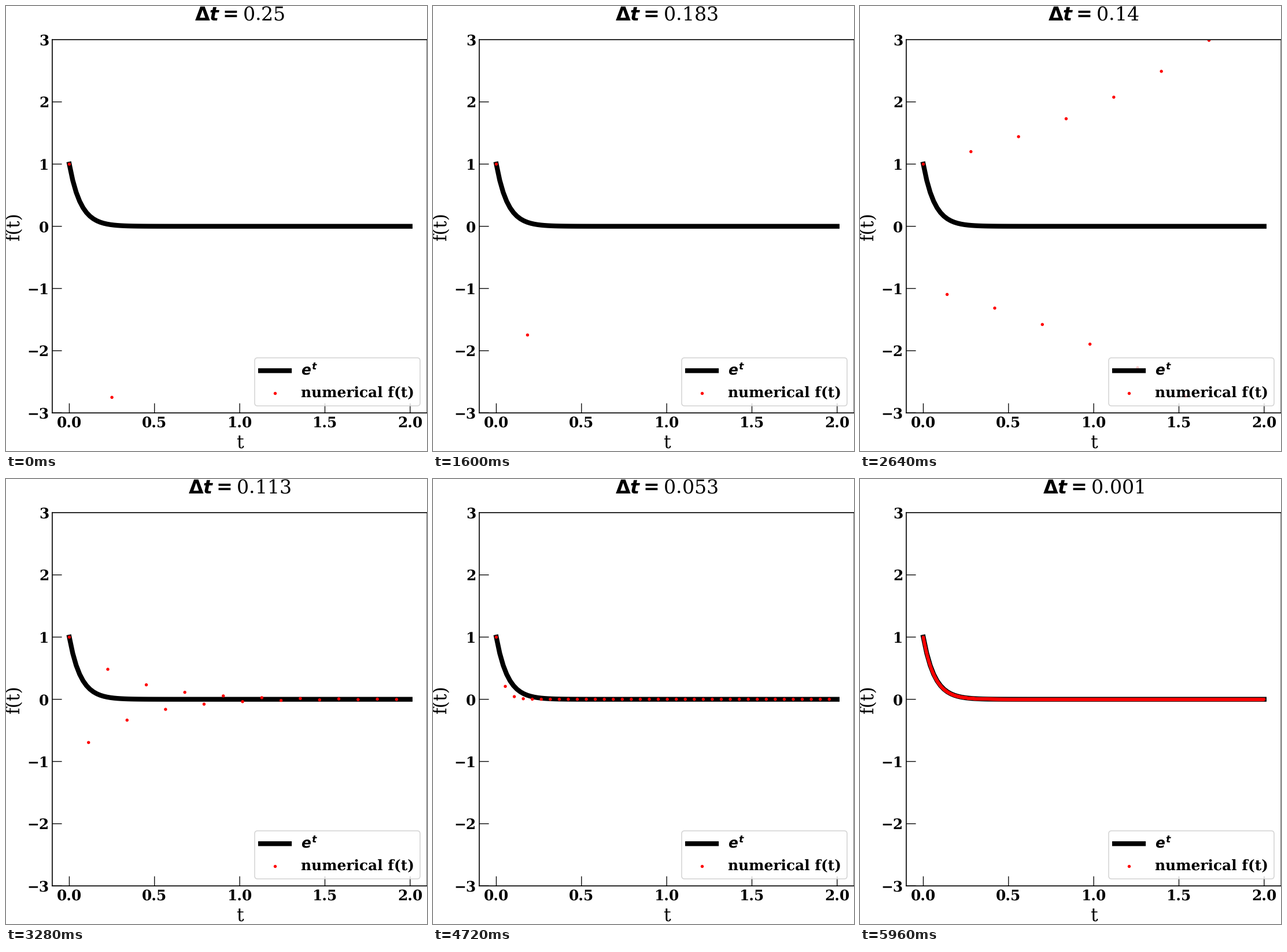
These frames come from a looping animation (728x769 px, 6 s). A matplotlib script:

```python
import numpy as np
import matplotlib.pyplot as plt
from matplotlib.animation import FuncAnimation

W, H, DPI = 728, 769, 64
FRAMES, INTERVAL = 150, 40
UNIT = 1.66  # pixels per drawing unit
U = UNIT * 72 / DPI  # the same unit in points
RATE = 15
STEPS = np.linspace(0.25, 0.001, FRAMES)
DOT = 5 * U**2

plt.rcParams.update({
    "font.family": "DejaVu Serif",
    "font.weight": "bold",
    "font.size": 15 * U,
    "text.hinting": "no_hinting",
    "mathtext.fontset": "dejavusans",
    "axes.linewidth": 1.0 * U,
    "axes.labelsize": 19 * U,
    "axes.labelpad": 4 * U,
    "axes.titlesize": 20 * U,
    "axes.titlepad": 20 * U,
    "lines.linewidth": 1.5 * U,
    "patch.linewidth": 1.0 * U,
    "legend.fontsize": 15 * U,
})

fig = plt.figure(figsize=(W / DPI, H / DPI), dpi=DPI, facecolor="white")
left, right, top, bottom = 80, 728.3, 58.2, 703.2
ax = fig.add_axes([left / W, 1 - bottom / H, (right - left) / W, (bottom - top) / H])
xticks, yticks = np.arange(0, 2.1, 0.5), np.arange(-3, 4)
ax.set(xlim=(-0.1, 2.1), ylim=(-3, 3), xlabel="t", ylabel="f(t)",
       xticks=xticks, yticks=yticks)
ax.tick_params(length=0, pad=3.5 * U, labelsize=15 * U)

# Inward ticks as plain lines, so they sit at subpixel positions like the spines.
tick = dict(color="black", lw=0.8 * U, snap=False, zorder=2.01)
ax.vlines(xticks, 0, 10 * UNIT / (bottom - top),
          transform=ax.get_xaxis_transform(), **tick)
ax.hlines(yticks, 0, 10 * UNIT / (right - left),
          transform=ax.get_yaxis_transform(), **tick)
ax.set(xlim=(-0.1, 2.1), ylim=(-3, 3))
for spine in ax.spines.values():
    spine.set_snap(False)

t = np.linspace(0, 2, 100)
ax.plot(t, np.exp(-RATE * t), color="black", lw=5 * U, label="$e^t$")
dots = ax.scatter([0], [1], s=DOT, color="red", zorder=2.2,
                  label="numerical f(t)")
title = ax.set_title("")
legend = ax.legend(loc="lower right")
for line in legend.get_lines():
    line.set_snap(False)


def euler(dt):
    """Forward Euler solution of f' = -RATE * f with f(0) = 1."""
    times = np.arange(0, 2, dt)
    return np.column_stack([times, (1 - RATE * dt) ** np.arange(len(times))])


def update(i):
    dt = STEPS[i]
    points = euler(dt)
    dots.set_offsets(points)
    dots.set_sizes(np.full(len(points), DOT))  # one size each avoids pixel rounding
    title.set_text(rf"$\Delta t = ${round(float(dt), 3)}")
    return dots, title


anim = FuncAnimation(fig, update, frames=FRAMES, interval=INTERVAL,
                     init_func=lambda: update(0), repeat=True, repeat_delay=0)
plt.show()
```
